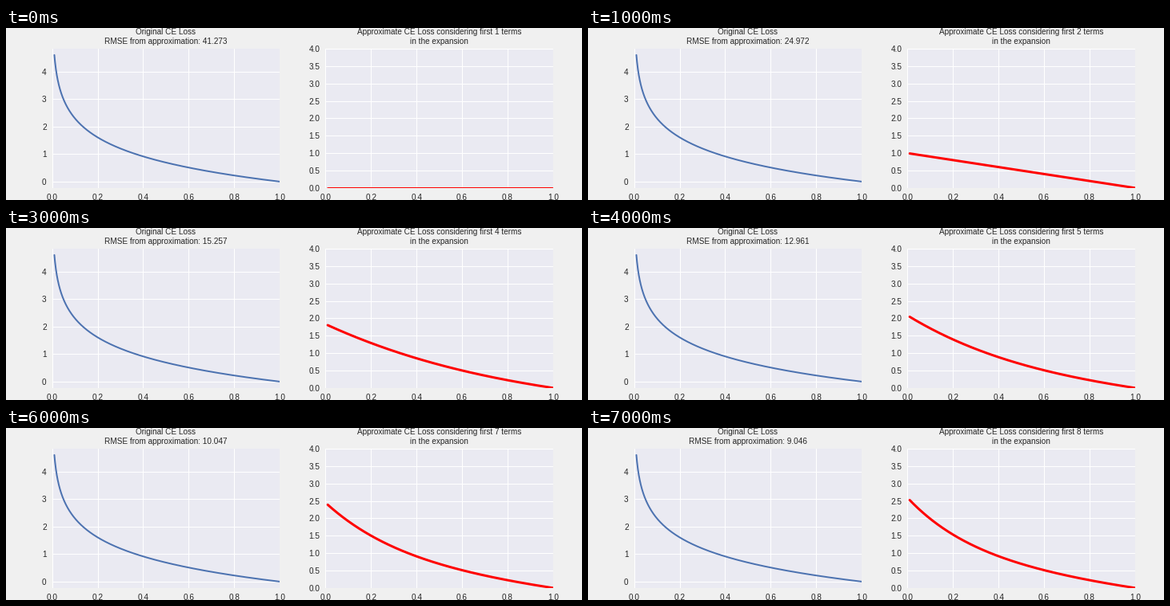
A matplotlib script that plays this animation: 720x216 px, repeating every 8000 ms.

```python
import matplotlib.pyplot as plt
import numpy as np
from matplotlib.animation import FuncAnimation

plt.style.use("seaborn-v0_8")
plt.rcParams.update({
    "font.family": "Liberation Sans",
    "font.size": 10,
    "axes.titlesize": 10,
    "figure.facecolor": "#f0f0f0",
})

TERMS = 8
x = np.linspace(0.01, 1, 1001)
loss = -np.log(x)


def expansion(terms):
    """Taylor series of -log(x) around 1, counting the zero term."""
    return sum(((1 - x) ** k / k for k in range(1, terms)), np.zeros_like(x))


fig, (left, right) = plt.subplots(1, 2, figsize=(10, 3), dpi=72)
fig.subplots_adjust(left=0.08, right=0.95, bottom=0.07, top=0.88, wspace=0.2)

left.plot(x, loss, color="#4c72b0", lw=2)
left.set_xlim(0, 1)
curve, = right.plot(x, expansion(1), color="red", lw=3)
right.set(xlim=(0, 1), ylim=(0, 4), yticks=np.arange(0, 4.1, 0.5))


def update(frame):
    terms = frame + 1
    approx = expansion(terms)
    error = np.sqrt(np.sum((loss - approx) ** 2))
    curve.set_ydata(approx)
    left.set_title(f"Original CE Loss\nRMSE from approximation: {error:.3f}")
    right.set_title(f"Approximate CE Loss considering first {terms} terms\n"
                    "in the expansion")
    return curve, left.title, right.title


anim = FuncAnimation(fig, update, frames=TERMS, interval=1000,
                     init_func=lambda: update(0), repeat=True)
plt.show()
```
